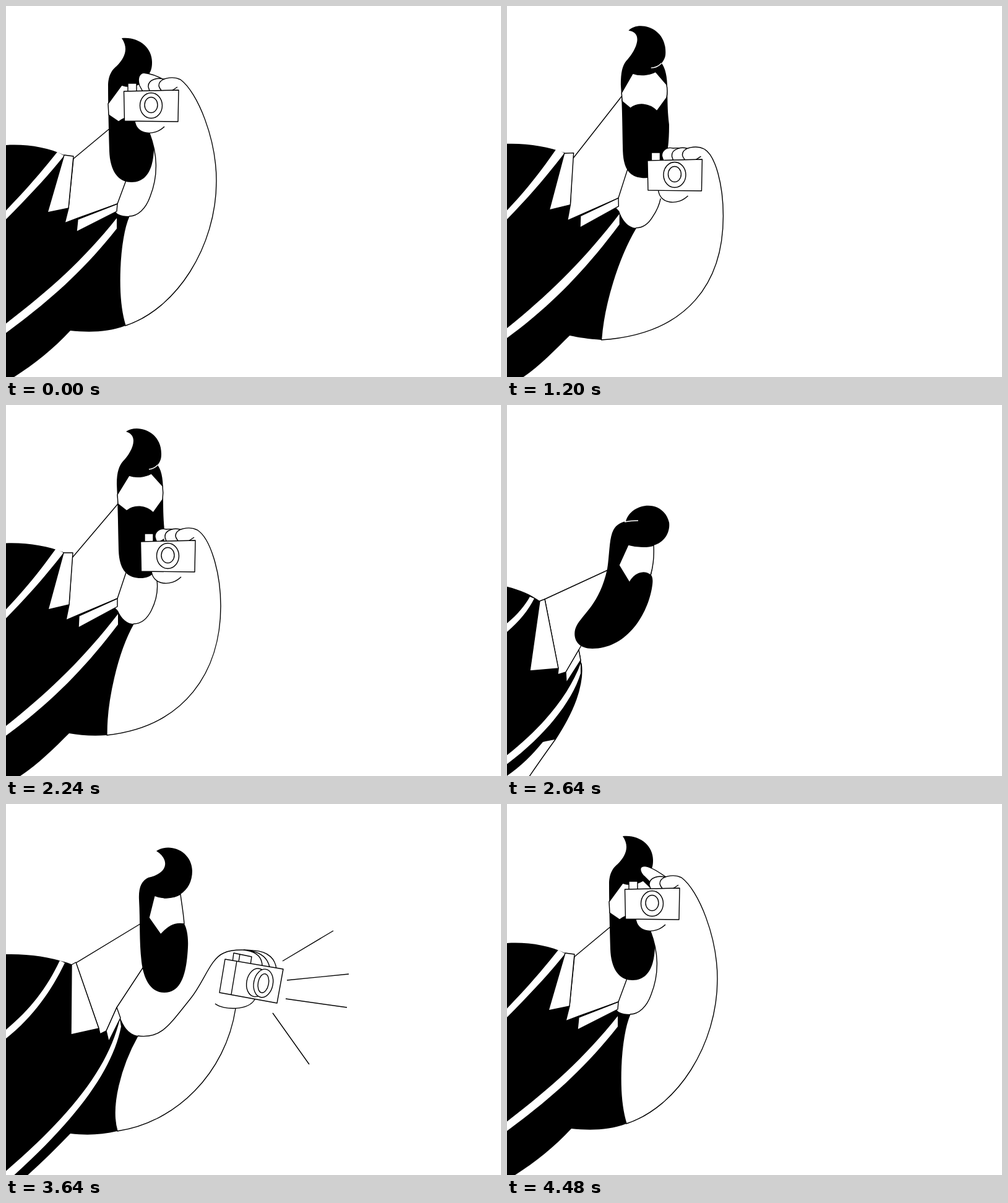
Animation of 800 by 600 pixels, one loop 4520 ms. Source, as an HTML page:

```html
<!DOCTYPE html>
<html lang="en">
<head>
<meta charset="utf-8">
<title>Photographer</title>
<style>
  html, body { margin: 0; width: 100%; height: 100%; overflow: hidden; background: #fff; }
  svg { display: block; width: 100vw; height: 100vh; }
  .ink { fill: #000; }
  .paper { fill: #fff; }
  .line { fill: #fff; stroke: #000; stroke-width: 1.4; stroke-linejoin: round; }
  .stroke { fill: none; stroke: #000; stroke-width: 1.4; }
  .parting { fill: none; stroke: #fff; stroke-width: 1.4; }
</style>
</head>
<body>
<svg viewBox="0 0 800 600">
  <path id="torso" class="ink"/>
  <path id="strapL" class="paper"/>
  <path id="strapR" class="paper"/>
  <path id="neck" class="line"/>
  <path id="collarL" class="line"/>
  <path id="collarR" class="line"/>
  <path id="head" class="ink"/>
  <path id="face" class="line"/>
  <path id="parting" class="parting"/>
  <path id="arm" class="line"/>
  <g id="front">
    <path class="line" d="M256,195 C240,211 210,209 208,185 L250,180"/>
    <path id="finger" class="line"/>
    <path class="line" d="M262,121 C246,113 229,119 230,131 L233,140 L258,140"/>
    <path class="line" d="M282,119 C270,113 247,116 247,129 C248,134 251,137 255,141 L275,145"/>
    <path class="stroke" d="M268,137 L277,131"/>
    <path class="line" d="M197,139 V125 H211 V139"/>
    <path class="line" d="M190.5,138 L279,136 L278,187 L191.5,186 Z"/>
    <ellipse class="line" cx="234.5" cy="161" rx="18" ry="20.5"/>
    <ellipse class="line" cx="234.5" cy="160" rx="10.5" ry="12.5"/>
  </g>
  <g id="side">
    <path class="line" d="M338,323 C352,334 392,334 402,316 L370,290"/>
    <path class="line" d="M352,241 C362,236 378,235 400,237 C425,238 436,252 437,268 L354,280"/>
    <path class="stroke" d="M393,237 C418,241 424,254 426,264 M384,236 C410,239 414,253 414,262"/>
    <path class="line" d="M366,256 L368,241 L397,247 L395,260 M378,243 L376,255"/>
    <path class="line" d="M354,251 L448,267 L438,322 L345,305 Z"/>
    <path class="stroke" d="M373,254 L364,308"/>
    <g transform="rotate(11 411 289)">
      <ellipse class="line" cx="405" cy="290" rx="16" ry="23"/>
      <ellipse class="line" cx="416" cy="289" rx="15.5" ry="23"/>
      <ellipse class="line" cx="416" cy="289" rx="8.5" ry="15.5"/>
    </g>
  </g>
  <path id="rays" class="stroke"/>
</svg>
<script>
const LOOP = 4520;
const $ = id => document.getElementById(id);

const eye = {
  cam: '235,162',
  torso: 'M-20,227 C20,221 62,226 94,241 L180,336 C186,339 192,340 199,340 C183,375 178,470 193,517 C165,528 132,528 104,525 C75,556 45,580 10,602 L-20,620',
  strapL: 'M83,236 C56,270 30,300 -10,341 L-10,355 C35,310 65,278 94,242',
  strapR: 'M179,343 C120,417 60,468 -10,521 L-10,536 C60,485 120,435 179,360',
  neck: 'M109,247 L175,192 L200,266 L180,320 L116,343 L95,351 L101,327 Z',
  collarL: 'M94,241 L109,243 L101,327 L67,334 Z',
  collarR: 'M116,345 L180,320 L179,332 L114,365 Z',
  head: 'M187,52 C215,49 237,68 236,92 C236,100 234,106 231,110 C237,118 239,130 239,150 C238,175 238,205 239,232 C238,262 228,285 203,285 C178,285 168,262 167,235 C166,200 165,160 165,130 C165,110 173,102 179,97 C193,83 198,68 187,52',
  face: 'M165,158 L187,128 C198,132 210,130 220,124 L239,142 C239,150 239,158 239,166 L226,186 C214,176 196,176 182,187 L166,176 Z',
  parting: 'M226,115 Q230,113 232,110',
  arm: 'M232,206 C245,240 246,275 233,308 C226,328 213,340 199,340 C183,375 178,470 193,517 C275,490 340,390 340,283 C340,215 310,140 282,119'
};

const lowered = {
  cam: '262,245',
  torso: 'M-20,225 C20,220 62,226 93,238 L181,333 C186,345 196,354 206,354 C180,400 162,480 163,534 C140,536 120,534 102,531 C78,555 50,583 20,602 L-20,620',
  strapL: 'M81,232 C55,268 30,300 -10,341 L-10,355 C35,310 65,275 93,239',
  strapR: 'M181,338 C120,417 60,472 -10,527 L-10,542 C60,492 120,436 181,355',
  neck: 'M107,247 L185,155 L197,262 L180,313 L118,339 L97,348 L102,323 Z',
  collarL: 'M93,239 L108,239 L102,323 L68,331 Z',
  collarR: 'M118,341 L180,313 L180,326 L117,360 Z',
  head: 'M194,43 C212,30 252,42 251,80 C251,87 249,92 245,97 C253,108 254,125 254,145 C254,165 254,180 256,202 C256,245 248,280 218,280 C192,280 183,262 182,235 C181,200 181,165 179,128 C179,108 183,98 189,91 C202,78 217,50 194,43',
  face: 'M180,145 L199,114 C210,118 224,117 235,111 L253,131 C254,138 254,146 253,153 L238,174 C226,162 207,161 195,171 L181,160 Z',
  parting: 'M231,104 Q240,103 245,97',
  arm: 'M244,284 C246,300 242,318 235,332 C228,346 218,354 206,354 C180,400 162,480 163,534 C290,520 347,430 347,325 C347,270 330,215 309,202'
};

const crouch = {
  cam: '-120,800',
  torso: 'M-20,290 C10,294 35,304 53,317 L116,396 C118,402 119,407 120,418 C124,455 108,495 78,541 C72,542 65,543 58,545 C40,567 20,587 -5,603 L-20,620',
  strapL: 'M37,310 C28,326 15,342 -10,361 L-10,375 C15,356 33,335 44,313',
  strapR: 'M119,418 C100,470 55,525 -10,574 L-10,588 C60,538 105,480 119,434',
  neck: 'M61,314 L165,266 L125,380 L116,396 L95,432 L82,436 L83,427 Z',
  collarL: 'M53,317 L61,314 L83,426 L37,430 Z',
  collarR: 'M95,432 L116,396 L119,413 L96,449 Z',
  head: 'M192,188 C200,158 252,150 262,190 C264,205 255,222 237,227 C238,245 236,262 233,275 C236,280 236,285 234,297 C225,345 190,394 138,394 C108,394 106,370 112,358 C122,338 150,322 162,265 C166,240 165,215 172,202 C177,193 184,190 192,188',
  face: 'M181,259 L196,226 C207,229 225,231 237,227 L237,227 C238,245 236,262 232,275 L232,275 C220,266 205,273 198,287 L181,259 Z',
  parting: 'M190,189 Q200,187 212,187',
  arm: 'M20,625 C36,600 55,573 78,541 C108,495 125,450 120,418 C124,455 108,495 78,541 C55,573 36,600 20,625 C0,650 -40,720 -60,760'
};

const reach = {
  cam: '397,286',
  torso: 'M-20,244 C30,240 75,247 108,260 L180,332 C188,360 198,372 213,375 C185,425 168,490 180,529 C155,535 130,536 104,533 C82,556 58,580 33,602 L-20,620',
  strapL: 'M87,253 C65,300 35,338 -10,373 L-10,387 C40,350 72,305 95,257',
  strapR: 'M184,348 C165,425 110,500 -10,602 L0,612 C115,510 172,430 186,360',
  neck: 'M113,257 L225,189 L225,259 L179,329 L162,367 L152,372 L150,363 Z',
  collarL: 'M106,260 L113,256 L150,363 L105,373 Z',
  collarR: 'M162,367 L179,329 L185,346 L166,384 Z',
  head: 'M243,76 C265,62 300,76 301,108 C301,125 294,138 282,146 C284,160 287,178 288,194 C292,200 295,215 294,232 C292,270 285,305 256,305 C232,305 222,280 219,255 C215,220 217,190 215,155 C214,135 219,124 230,119 C262,112 265,90 243,76',
  face: 'M231,184 L240,148 C253,154 270,153 282,146 L282,146 C284,162 287,178 288,194 L288,194 C270,191 260,200 250,211 L231,184 Z',
  parting: 'M243,76 Q243,76 243,76',
  arm: 'M352,241 C330,250 320,288 298,315 C262,360 250,380 213,375 C185,425 168,490 180,529 C275,515 355,435 371,331 C373,328 374,322 375,318'
};

const raised = {
  ...eye,
  cam: '232,172.5',
  torso: 'M-20,227 C20,221 62,226 94,241 L180,336 C186,339 192,340 198,340 C175,380 177,480 187,518 C160,530 130,536 100,530 C75,556 45,580 10,602 L-20,620',
  neck: 'M110,244 L156,185 L187,268 L180,320 L116,343 L95,351 L101,327 Z',
  head: 'M180,38 C202,38 214,62 214,80 C214,90 212,96 208,102 C218,111 221,125 222,145 C222,180 224,210 225,238 C223,262 212,281 186,281 C160,281 150,262 150,236 C149,200 148,160 148,125 C149,103 155,93 162,86 C178,68 186,62 180,38',
  face: 'M148,128 L157,113 C170,119 185,119 197,114 L222,140 C222,147 222,154 222,160 L205,185 C197,162 172,160 157,170 L149,160 Z',
  parting: 'M205,106 Q209,103 210,99',
  arm: 'M218,216 C232,250 238,285 226,315 C219,330 208,339 198,340 C175,380 177,480 187,518 C270,490 340,390 347,310 C347,260 305,135 279,129.5'
};

const fingerUp = 'M258,119 C247,111 228,98 219,101 C213,103 216,112 222,117 L236,131';
const fingerMid = 'M256,120 C243,112 232,109 222,108 C213,110 213,122 216,129 L222,140';
const fingerDown = 'M250,120 C246,118 240,117 232,118 C220,115 213,124 214,131 L217,140';

const NUM = /-?\d+(\.\d+)?/g;
const lerp = (a, b, k) => a + (b - a) * k;

function mixPath(a, b, k) {
  const target = b.match(NUM);
  let i = 0;
  return a.replace(NUM, n => lerp(+n, +target[i++], k).toFixed(2));
}

function mix(p, q, k) {
  const out = {};
  for (const part in p) out[part] = mixPath(p[part], q[part], k);
  return out;
}

const poses = [
  [0, eye], [920, eye],
  [1200, mix(eye, lowered, 1.35)],
  [1430, mix(eye, lowered, 0.93)],
  [1620, lowered], [1740, lowered],
  [1960, mix(eye, lowered, 0.95)],
  [2220, lowered], [2360, lowered],
  [2640, crouch],
  [2820, mix(crouch, reach, 1.05)],
  [3040, reach], [3740, reach],
  [4040, raised],
  [4320, eye], [LOOP, eye]
];
const lifts = [[0, 0.5], [160, 0], [4200, 0], [4430, 1], [4480, 1], [LOOP, 0.5]];
const rays = [[447, 254, 529, 205], [454, 285, 554, 275], [452, 315, 551, 329], [431, 338, 490, 421]];

const ramp = (t, start, end) => {
  const k = Math.min(1, Math.max(0, (t - start) / (end - start)));
  return k * k * (3 - 2 * k);
};

function sample(keys, t, blend) {
  const i = Math.max(1, keys.findIndex(key => key[0] > t));
  const [t0, a] = keys[i - 1], [t1, b] = keys[i];
  return a === b ? a : blend(a, b, ramp(t, t0, t1));
}

function rayPath(t) {
  const head = ramp(t, 3470, 3600), tail = ramp(t, 3680, 3820);
  if (head <= tail) return '';
  return rays.map(([x, y, u, v]) =>
    `M${lerp(x, u, tail)},${lerp(y, v, tail)} L${lerp(x, u, head)},${lerp(y, v, head)}`).join(' ');
}

function render(t) {
  const { cam, ...parts } = sample(poses, t, mix);
  for (const id in parts) $(id).setAttribute('d', parts[id]);

  const [x, y] = cam.split(',').map(Number);
  const sideView = t > 2640 && t < 3890;
  $('front').setAttribute('transform', `translate(${x - 235} ${y - 162})`);
  $('side').setAttribute('transform', `translate(${x - 397} ${y - 286})`);
  $('front').style.display = sideView ? 'none' : '';
  $('side').style.display = sideView ? '' : 'none';

  const lift = sample(lifts, t, lerp) * 2;
  $('finger').setAttribute('d', lift < 1
    ? mixPath(fingerDown, fingerMid, lift)
    : mixPath(fingerMid, fingerUp, lift - 1));
  $('rays').setAttribute('d', rayPath(t));
}

const start = performance.now();
function tick() {
  render((performance.now() - start) % LOOP);
  requestAnimationFrame(tick);
}
tick();
</script>
</body>
</html>
```
